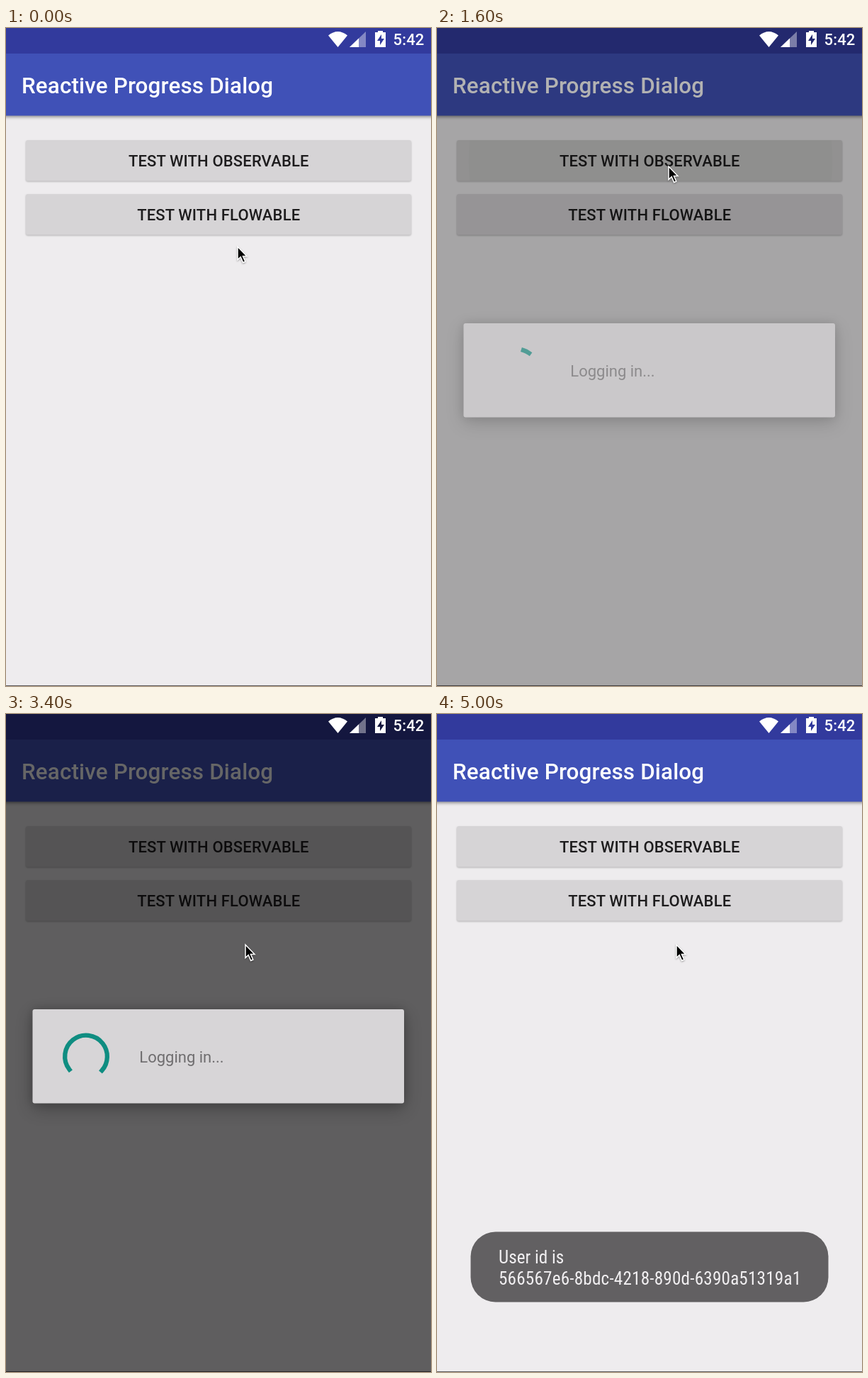
An HTML page that plays this animation: 600 px wide and 927 px high, repeating every 5100 ms.

```html
<!DOCTYPE html>
<html lang="en">
<head>
<meta charset="utf-8">
<title>Reactive Progress Dialog</title>
<style>
  html, body { margin: 0; width: 100%; height: 100%; overflow: hidden; background: #eeecee; }
  svg { display: block; width: 600px; height: 927px; font: 22px Roboto, sans-serif; }
  .medium { font-weight: 500; letter-spacing: .15px; }
  .button { fill: #d6d4d6; filter: drop-shadow(0 1px 1px rgba(0, 0, 0, .25)); }
  .label { text-anchor: middle; fill: #1d1c1d; }
  #bar { filter: drop-shadow(0 2px 2px rgba(0, 0, 0, .4)); }
  #panel { filter: drop-shadow(0 0 7px rgba(0, 0, 0, .22)) drop-shadow(0 8px 12px rgba(0, 0, 0, .3)); }
  #toast text { font: 25.2px "Roboto Condensed", Roboto, sans-serif; font-stretch: 75%; fill: #f1eff1; }
  #toast .id { letter-spacing: .18px; }
  #cursor { filter: drop-shadow(0 1px 1px rgba(0, 0, 0, .35)); }
</style>
</head>
<body>
<svg viewBox="0 0 600 927">
  <clipPath id="buttonClip"><rect x="28" y="158" width="544" height="57.5" rx="3"/></clipPath>

  <rect width="600" height="927" fill="#eeecee"/>
  <rect id="bar" x="-10" y="30" width="620" height="93.5" fill="#4051b7"/>
  <rect width="600" height="36" fill="#323a9d"/>
  <text class="medium" x="22" y="92" font-size="31.4" fill="#fff">Reactive Progress Dialog</text>

  <rect class="button" x="28" y="158" width="544" height="57.5" rx="3"/>
  <g id="ripple" clip-path="url(#buttonClip)">
    <rect x="28" y="158" width="544" height="57.5" fill="#cbcbca"/>
    <circle id="wave" fill="#c4c3c0"/>
  </g>
  <text class="medium label" x="300.3" y="195">TEST WITH OBSERVABLE</text>
  <rect class="button" x="28" y="234" width="544" height="57.5" rx="3"/>
  <text class="medium label" x="300.3" y="271">TEST WITH FLOWABLE</text>
  <rect y="926" width="600" height="1" fill="#5f5d5f"/>

  <rect id="dim" width="600" height="927"/>

  <g id="dialog">
    <rect id="panel" x="37.5" y="416" width="524.5" height="132.5" rx="3" fill="#eeecee"/>
    <circle id="spinner" r="29.85" pathLength="360" fill="none" stroke="#009688"
      stroke-width="6.28" stroke-linecap="square"/>
    <text x="188.3" y="491" fill="#737173">Logging in...</text>
  </g>

  <g id="toast">
    <rect x="47.5" y="729.5" width="505" height="99" rx="35" fill="#626062"/>
    <text x="87" y="774">User id is</text>
    <text class="id" x="87" y="804">566567e6-8bdc-4218-890d-6390a51319a1</text>
  </g>

  <g fill="#fff">
    <path d="M468.5 27 L455 10.5 Q468.5 -.5 482 10.5 Z"/>
    <path d="M508 5 V27 H485 Z" opacity=".4"/>
    <path d="M498 14.5 V27 H485 Z"/>
    <path fill-rule="evenodd" d="M525 4 h7 v2 h4 v21 h-15 v-21 h4 Z M530 9 l-6 9 h4 v6 l6 -9 h-4 Z"/>
    <text class="medium" x="546.5" y="24">5:42</text>
  </g>

  <path id="cursor" d="M1 2 V20.5 L5.2 16.6 L8.6 24.4 L11.8 23 L8.4 15.4 H14 Z"
    stroke="#fff" stroke-width="1.5"/>
</svg>
<script>
const LOOP = 5100, STEP = 100;
const el = id => document.getElementById(id);
const [ripple, wave, dim, dialog, spinner, toast, cursor] =
  ['ripple', 'wave', 'dim', 'dialog', 'spinner', 'toast', 'cursor'].map(el);

const clamp = v => Math.min(1, Math.max(0, v));
const ramp = (t, from, to) => clamp((t - from) / (to - from));
const smooth = p => p * p * (3 - 2 * p);
const mix = (a, b, p) => a + (b - a) * p;
const set = (node, attrs) => {
  for (const name in attrs) node.setAttribute(name, attrs[name]);
};

// Material standard curve, cubic-bezier(.4, 0, .2, 1)
function standard(x) {
  let lo = 0, hi = 1;
  for (let i = 0; i < 24; i++) {
    const s = (lo + hi) / 2, q = 1 - s;
    if (1.2 * q * q * s + .6 * q * s * s + s ** 3 < x) lo = s; else hi = s;
  }
  return smooth(lo);
}

// Material indeterminate ring: slow rotation plus trimmed start and end
function drawSpinner(elapsed) {
  const u = elapsed % 1333 / 1333;
  const start = 270 * standard(clamp(2 * u - 1));
  const end = 270 * standard(clamp(2 * u));
  const angle = elapsed * 720 / 6665 + 90 * u + start - 90;
  set(spinner, {
    transform: `translate(113 482.5) rotate(${angle})`,
    'stroke-dasharray': `${Math.max(.1, end - start)} 360`
  });
}

function draw(t) {
  const up = smooth(ramp(t, 200, 800)), away = smooth(ramp(t, 1900, 2400));
  const x = mix(326, 337, away), y = mix(mix(306, 193, up), 323, away);
  set(cursor, { transform: `translate(${x} ${y})` });

  const spread = 1 - Math.exp(-.00885 * Math.max(0, t - 1280));
  set(wave, { cx: mix(326, 300, spread), cy: mix(195, 187, spread), r: 273 * spread });
  set(ripple, { opacity: ramp(t, 1280, 1400) * (1 - ramp(t, 1520, 1680)) });

  const shown = ramp(t, 1520, 1680);
  set(dim, { opacity: .6 * shown * (1 - ramp(t, 3400, 3600)) });
  set(dialog, { opacity: shown * (1 - ramp(t, 3380, 3504)) });
  drawSpinner(Math.min(Math.max(t, 1501), 3335) - 1501);

  set(toast, { opacity: 1 - (1 - ramp(t, 3485, 3985)) ** 2 });
}

function tick() {
  draw(Math.floor(performance.now() / STEP) * STEP % LOOP);
  requestAnimationFrame(tick);
}
tick();
</script>
</body>
</html>
```
